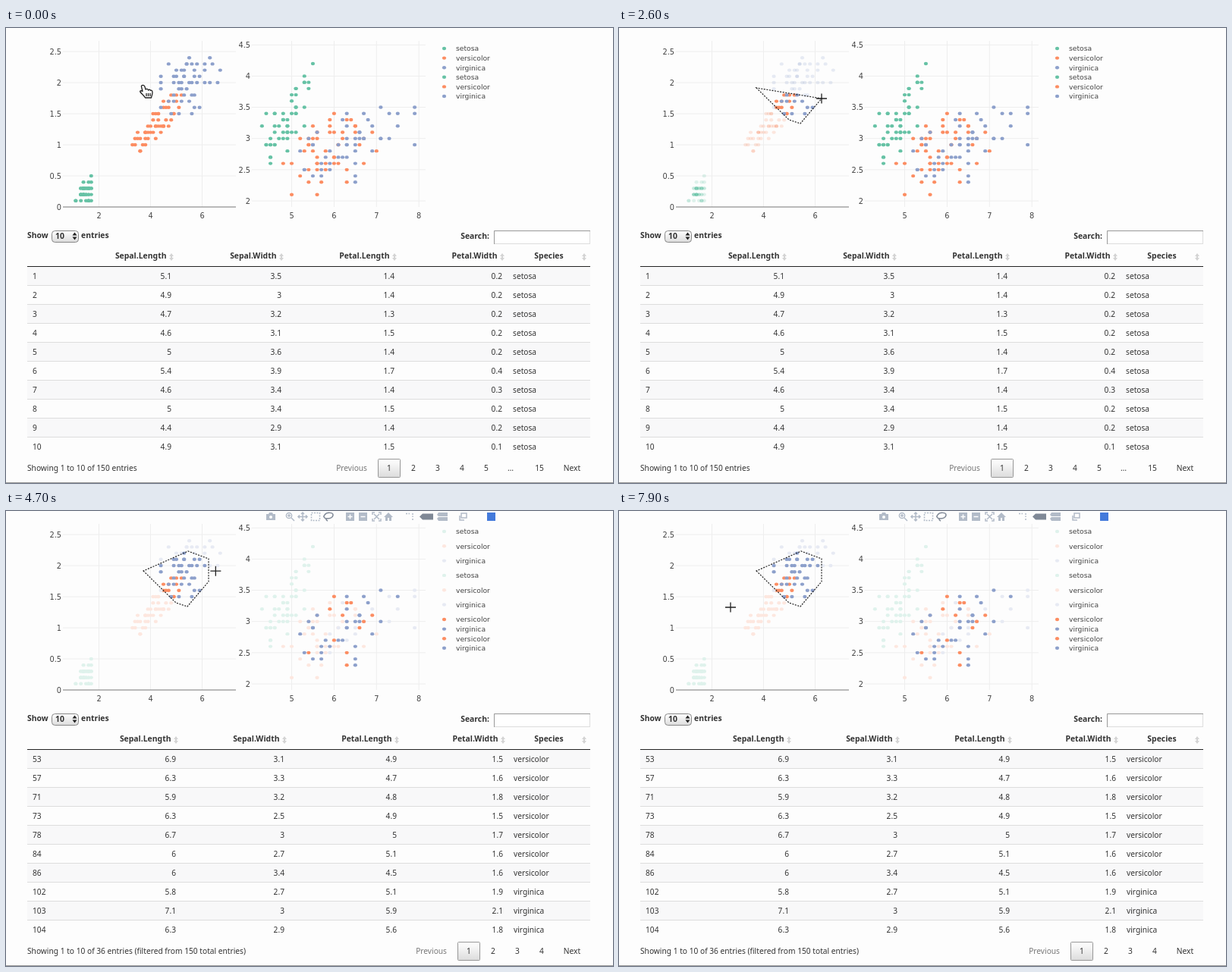
These frames come from a looping animation (800x600 px, 8 s). An HTML page:

```html
<!DOCTYPE html>
<html lang="en">
<head>
<meta charset="utf-8">
<title>Linked scatter plots and table</title>
<style>
  html, body { margin: 0; width: 100%; height: 100%; overflow: hidden; background: #fdfdfd; }
  svg { display: block; width: 800px; height: 600px; }
  text { font: 10.2px "Noto Sans", "Open Sans", sans-serif; fill: #333; }
  .b { font-weight: 700; font-size: 10.4px; }
  .tick { font: 9.8px "DejaVu Sans", sans-serif; fill: #444; }
  .key { font: 9.2px "DejaVu Sans", sans-serif; fill: #444; }
  .off { fill: #777; }
  .icon { fill: none; stroke: #b2bbc8; stroke-width: 1.5; }
  .icon .fill { fill: #b2bbc8; stroke: none; }
  .icon .on { stroke: #7f8896; }
</style>
</head>
<body>
<svg id="stage" viewBox="0 0 800 600">
  <defs>
    <linearGradient id="button" x2="0" y2="1">
      <stop stop-color="#fff"/><stop offset="1" stop-color="#dcdcdc"/>
    </linearGradient>
    <path id="sort" fill="#d4d4d4" d="M0-5 3-1H1V1H-1V-1H-3ZM0 5 3 1H-3Z"/>
  </defs>
  <g id="base"></g>
  <g id="before"></g>
  <g id="after"></g>
  <g id="petals"></g>
  <path id="lasso" fill="none" stroke="#222" stroke-width="1.2" stroke-dasharray="2 1.6"/>
  <g id="modebar" class="icon">
    <path class="fill" d="M343 4h3l1-2h4l1 2h3v8h-12Z"/>
    <circle cx="349" cy="8" r="2" fill="#fdfdfd" stroke="none"/>
    <circle cx="373" cy="6" r="3.6"/><path d="M376 9l4 4M371 6h4M373 4v4"/>
    <path d="M385 7.5h12M391 2v11M387 5.5l-2 2 2 2M395 5.5l2 2-2 2M389 4l2-2 2 2M389 11l2 2 2-2"/>
    <rect x="402.5" y="2.5" width="11" height="10" stroke-dasharray="2 1.5"/>
    <path class="on" d="M423 10c-4 0-5-3-3-5 3-4 11-3 11 0 0 4-5 5-8 5-2 1-1 2 1 3"/>
    <path class="fill" d="M448 2h11v11h-11ZM465 2h11v11h-11Z"/>
    <path stroke="#fdfdfd" d="M450.5 7.5h6M453.500 4.5v6M467.5 7.5h6"/>
    <path d="M483 5V2h3M491 2h3v3M494 10v3h-3M486 13h-3v-3M485 4l7 7M492 4l-7 7"/>
    <path class="fill" d="M504 2l6 6h-2v5h-3v-4h-2v4h-3V8h-2Z"/>
    <path d="M527 3.5h5M536 3v5M536 10v2" stroke-dasharray="2 1.5"/>
    <path d="M545 7.5l4-4h14v8h-14Z" fill="#7f8896" stroke="none"/>
    <path class="fill" d="M568 5l2-3h12v5h-12ZM568 10l2-2h12v5h-12Z"/>
    <path d="M598 6v6h6M600 3h7v6h-7Z"/>
    <rect x="634" y="2" width="11" height="11" fill="#447adb" stroke="none"/>
  </g>
  <g id="hand" fill="#fff" stroke="#222" stroke-width="1.3" stroke-linejoin="round">
    <path d="M0-5.500C2-6 2.500-5 3-3.500L4 0C5-1 7-1 7.500 1 9-.5 10.500.5 10.500 1.500 12 .5 13 2 13 4 13 7 12 8 11.500 11H3.500C2 8-1 6-3 3.500-4 2-2.500 1 0 2.500L-1.500-3.500C-2-4.500-1-5.500 0-5.500Z"/>
    <path d="M5 5v4M7.500 5v4M10 5v4" fill="none"/>
  </g>
  <path id="cross" d="M-7 0h14M0-6.500v13" stroke="#222" stroke-width="1.3"/>
  <path id="resize" d="M0-8 5-3H1.500V3H5L0 8-5 3H-1.500V-3H-5Z" fill="#111" stroke="#fff" stroke-width=".6"/>
</svg>
<script>
const $ = id => document.getElementById(id);

function add(parent, tag, attrs, text) {
  const el = document.createElementNS('http://www.w3.org/2000/svg', tag);
  for (const k in attrs) el.setAttribute(k, attrs[k]);
  if (text !== undefined) el.textContent = text;
  parent.append(el);
  return el;
}
const label = (g, x, y, text, cls = '', anchor = 'start') =>
  add(g, 'text', { x, y: y + 3.7, class: cls, 'text-anchor': anchor }, text);
const line = (g, x1, y1, x2, y2, stroke = '#eee') => add(g, 'line', { x1, y1, x2, y2, stroke });
const box = (g, x, y, width, height, more) => add(g, 'rect', { x, y, width, height, ...more });
const dot = (g, x, y, fill) => add(g, 'ellipse', { cx: x, cy: y, rx: 2.6, ry: 2.2, fill });

const species = ['setosa', 'versicolor', 'virginica'];
const solid = ['#66c2a5', '#fc8d62', '#8da0cb'];
const faint = ['#dff2ec', '#fde7df', '#e7eaf3'];

// Table pages: id, sepal length and width, petal length and width, species
const parse = text => text.trim().split('\n').map(row => row.trim().split(' '));
const firstPage = parse(`
  1 5.1 3.5 1.4 0.2 setosa
  2 4.9 3 1.4 0.2 setosa
  3 4.7 3.2 1.3 0.2 setosa
  4 4.6 3.1 1.5 0.2 setosa
  5 5 3.6 1.4 0.2 setosa
  6 5.4 3.9 1.7 0.4 setosa
  7 4.6 3.4 1.4 0.3 setosa
  8 5 3.4 1.5 0.2 setosa
  9 4.4 2.9 1.4 0.2 setosa
  10 4.9 3.1 1.5 0.1 setosa`);
const filteredPage = parse(`
  53 6.9 3.1 4.9 1.5 versicolor
  57 6.3 3.3 4.7 1.6 versicolor
  71 5.9 3.2 4.8 1.8 versicolor
  73 6.3 2.5 4.9 1.5 versicolor
  78 6.7 3 5 1.7 versicolor
  84 6 2.7 5.1 1.6 versicolor
  86 6 3.4 4.5 1.6 versicolor
  102 5.8 2.7 5.1 1.9 virginica
  103 7.1 3 5.9 2.1 virginica
  104 6.3 2.9 5.6 1.8 virginica`);

function seeded(seed) {
  return () => {
    seed = seed + 0x6D2B79F5 | 0;
    let n = Math.imul(seed ^ seed >>> 15, 1 | seed);
    n = n + Math.imul(n ^ n >>> 7, 61 | n) ^ n;
    return ((n ^ n >>> 14) >>> 0) / 2 ** 32;
  };
}
const random = seeded(12);
const bell = () => 2 * (random() + random() + random() - 1.5);
const linked = (z, r) => Math.max(-2.1, Math.min(2.1, r * z + Math.sqrt(1 - r * r) * bell()));

// Mean and spread of each measure, and how far it follows another one
const habits = [
  { mean: [5.0, 3.43, 1.46, 0.25], spread: [0.35, 0.38, 0.17, 0.1], follow: [0.74, 0.27, 0.33] },
  { mean: [5.94, 2.77, 4.26, 1.33], spread: [0.52, 0.31, 0.47, 0.2], follow: [0.53, 0.75, 0.79] },
  { mean: [6.59, 2.97, 5.55, 2.03], spread: [0.64, 0.32, 0.55, 0.27], follow: [0.46, 0.86, 0.32] }];

function grow(s) {
  const { mean, spread, follow } = habits[s];
  const sl = linked(0, 0), sw = linked(sl, follow[0]), pl = linked(sl, follow[1]), pw = linked(pl, follow[2]);
  const size = [sl, sw, pl, pw].map((z, i) => Math.round(10 * (mean[i] + spread[i] * z)) / 10);
  size[3] = Math.max(0.1, Math.min(2.5, size[3]));
  return { s, size };
}

const listed = [...firstPage, ...filteredPage].map(row =>
  ({ s: species.indexOf(row[5]), size: row.slice(1, 5).map(Number) }));
const flowers = species.flatMap((name, s) => {
  const group = listed.filter(f => f.s === s);
  while (group.length < 50) group.push(grow(s));
  return group;
});

const petalAt = (l, w) => [122.5 + 34 * (l - 2), 236 - 82 * w];
const sepalAt = (l, w) => [376.5 + 55.9 * (l - 5), 228 - 82.3 * (w - 2)];

const START = 1400, CLOSED = 4000, RELEASE = 4500, LOOP = 8000;
const route = [
  [0, 180, 81], [1200, 180, 81], [START, 181, 79], [2000, 224, 121], [2200, 239, 126],
  [2600, 267, 93], [3300, 267, 63], [CLOSED, 240, 53], [4300, 241, 59], [RELEASE, 241, 59],
  [5400, 400, 150], [6000, 325, 142], [7000, 131, 155], [7200, 131, 155], [7900, 147, 127]];

function pointer(t) {
  const i = route.findIndex(p => p[0] > t);
  if (i < 0) return route[route.length - 1].slice(1);
  const [t0, x0, y0] = route[i - 1], [t1, x1, y1] = route[i];
  const k = (t - t0) / (t1 - t0);
  return [x0 + (x1 - x0) * k, y0 + (y1 - y0) * k];
}

function lassoAt(t) {
  if (t < START) return [];
  const pts = route.filter(p => p[0] >= START && p[0] <= Math.min(t, CLOSED)).map(p => p.slice(1));
  if (t < CLOSED) pts.push(pointer(t));
  return pts;
}

function inside(poly, x, y) {
  let hit = false;
  poly.forEach(([ax, ay], i) => {
    const [bx, by] = poly[(i + 1) % poly.length];
    if ((ay > y) !== (by > y) && x < ax + (bx - ax) * (y - ay) / (by - ay)) hit = !hit;
  });
  return hit;
}

function drawAxes(g, at, lengths, widths, left, right) {
  for (const l of lengths) {
    const [x] = at(l, 0);
    line(g, x, 17, x, 236);
    label(g, x, 247, l, 'tick', 'middle');
  }
  for (const w of widths) {
    const [, y] = at(0, w);
    line(g, left, y, right, y, w ? '#eee' : '#777');
    label(g, left - 2, y, w, 'tick', 'end');
  }
}

function drawBase(g) {
  const halves = from => Array.from({ length: 6 }, (_, i) => from + i / 2);
  drawAxes(g, petalAt, [2, 4, 6], halves(0), 75, 303);
  drawAxes(g, sepalAt, [5, 6, 7, 8], halves(2), 324, 553);

  label(g, 28, 273.5, 'Show', 'b');
  box(g, 60.5, 267.5, 35, 15, { rx: 4, fill: 'url(#button)', stroke: '#888' });
  label(g, 65, 274.5, '10', 'b');
  add(g, 'path', { d: 'M87.5 273.5l3-4 3 4ZM87.5 275.500l3 4 3-4Z', fill: '#222' });
  label(g, 99, 273.5, 'entries', 'b');
  label(g, 637, 274.5, 'Search:', 'b', 'end');
  box(g, 643.5, 267.5, 126, 17, { fill: '#fff', stroke: '#ddd' });
  add(g, 'path', { d: 'M643.5 285V267.5H770', fill: 'none', stroke: '#999' });

  for (let i = 0; i < 10; i++) {
    const y = 315 + 25 * i;
    if (i % 2 === 0) box(g, 28, y, 742, 24, { fill: '#f8f8f9' });
    if (i < 9) line(g, 28, y + 24.5, 770, y + 24.5, '#ddd');
  }
  line(g, 28, 314.5, 770, 314.5, '#222');
  label(g, 715.5, 300.5, 'Species', 'b', 'middle');
  add(g, 'use', { href: '#sort', x: 762, y: 302 });
  line(g, 0, 599.5, 800, 599.5, '#999');
}

function drawTable(g, right, speciesX, rows) {
  ['Sepal.Length', 'Sepal.Width', 'Petal.Length', 'Petal.Width'].forEach((head, i) => {
    label(g, right[i] - 6.5, 300.5, head, 'b', 'end');
    add(g, 'use', { href: '#sort', x: right[i], y: 302 });
  });
  rows.forEach((row, r) => {
    const y = 327 + 25 * r;
    label(g, 35, y, row[0]);
    right.forEach((x, i) => label(g, x, y, row[i + 1], '', 'end'));
    label(g, speciesX, y, row[5]);
  });
}

function drawPager(g, info, buttonX, others) {
  label(g, 28, 580, info);
  label(g, buttonX - 14, 580.5, 'Previous', 'off', 'end');
  box(g, buttonX + 0.5, 568.5, 29, 24, { rx: 1, fill: 'url(#button)', stroke: '#979797' });
  [1, ...others].forEach((text, i) => {
    const shift = i > 5 ? 6 : 0;
    label(g, buttonX + 15 + 32 * i + shift, 580.5, text, '', 'middle');
  });
  label(g, 746, 580.5, 'Next', '', 'middle');
}

function legend(g, y, step, group, colors) {
  group.forEach((s, i) => {
    dot(g, 577.5, y + step * i, colors[s]);
    label(g, 593, y + step * i - 0.3, species[s], 'key');
  });
}

const both = [0, 1, 2, 0, 1, 2];

function drawBefore(g) {
  for (const { s, size } of flowers) dot(g, ...sepalAt(size[0], size[1]), solid[s]);
  legend(g, 27, 12.6, both, solid);
  drawTable(g, [218, 363, 512, 654], 668, firstPage);
  drawPager(g, 'Showing 1 to 10 of 150 entries', 490, [2, 3, 4, 5, '…', 15]);
}

function drawAfter(g) {
  const lasso = lassoAt(RELEASE);
  const picked = f => inside(lasso, ...petalAt(f.size[2], f.size[3]));
  const draw = (list, colors) => list.forEach(({ s, size }) => dot(g, ...sepalAt(size[0], size[1]), colors[s]));
  draw(flowers.filter(f => !picked(f)), faint);
  draw(flowers.filter(picked), solid);
  legend(g, 27, 19.3, both, faint);
  legend(g, 143, 12.6, [1, 2, 1, 2], solid);
  drawTable(g, [224, 367, 515, 655], 669, filteredPage);
  drawPager(g, 'Showing 1 to 10 of 36 entries (filtered from 150 total entries)', 595, [2, 3, 4]);
}

drawBase($('base'));
drawBefore($('before'));
drawAfter($('after'));
const petals = flowers.map(({ s, size }) => {
  const [x, y] = petalAt(size[2], size[3]);
  return { s, x, y, el: dot($('petals'), x, y, solid[s]) };
});

const show = (id, on) => { $(id).style.display = on ? '' : 'none'; };

function render(t) {
  const done = t >= RELEASE, dragging = t >= START && !done;
  const poly = lassoAt(t);
  $('lasso').setAttribute('d', poly.length ? 'M' + poly.join('L') + 'Z' : '');
  for (const { x, y, s, el } of petals) {
    const lit = !poly.length || inside(poly, x, y);
    // While dragging, faded dots are see-through and add up
    el.setAttribute('fill', lit || dragging ? solid[s] : faint[s]);
    el.setAttribute('fill-opacity', !lit && dragging ? 0.2 : 1);
  }
  show('before', !done);
  show('after', done);
  show('modebar', t >= 1000 && !dragging);

  const [x, y] = pointer(t);
  const kind = t < 1000 ? 'hand' : done && x > 304 && x < 328 ? 'resize' : 'cross';
  for (const id of ['hand', 'cross', 'resize']) show(id, id === kind);
  $(kind).setAttribute('transform', `translate(${x} ${y})`);
}

function tick() {
  render(Math.floor(performance.now() % LOOP / 100) * 100);
  requestAnimationFrame(tick);
}
tick();
</script>
</body>
</html>
```
